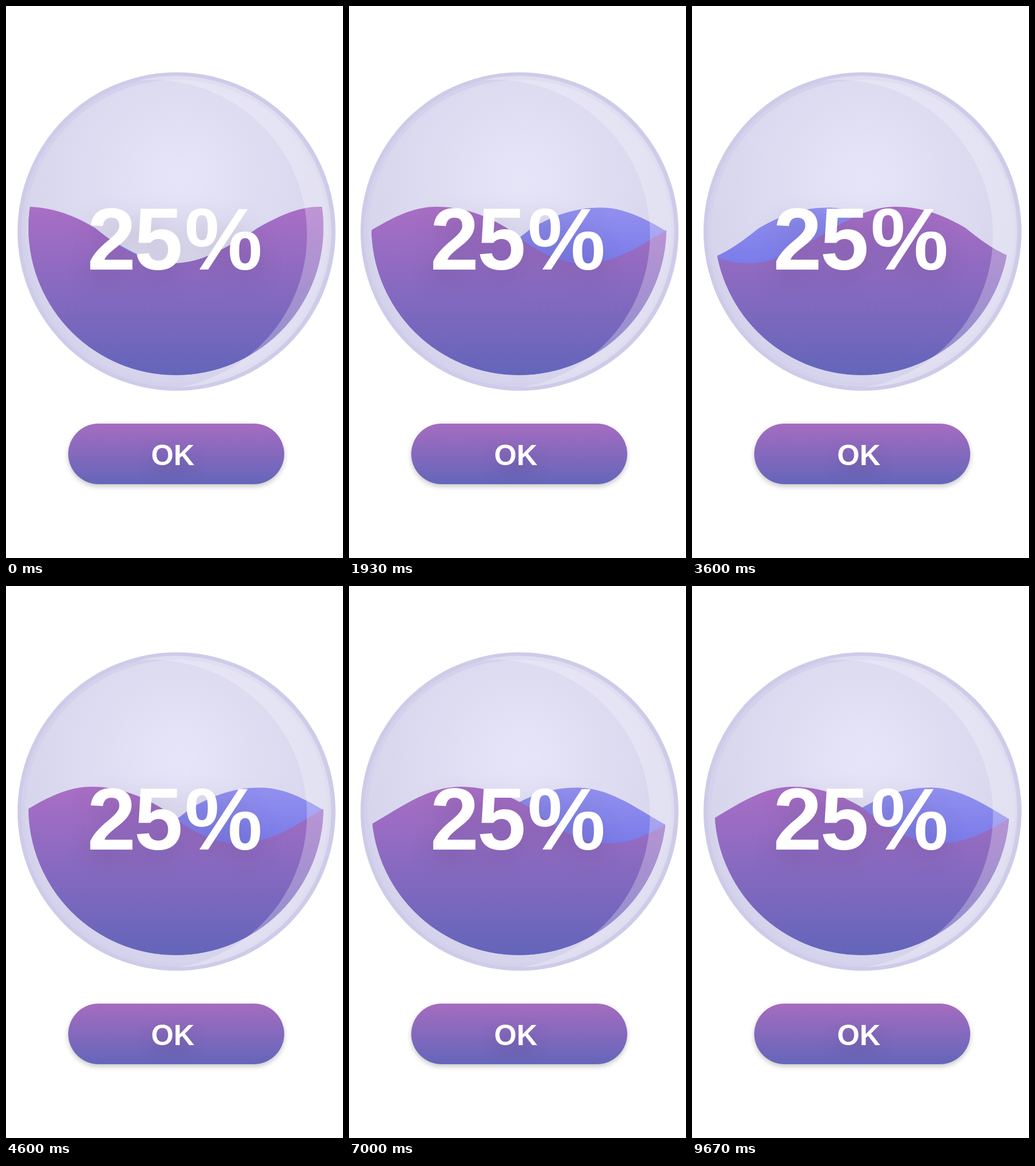
An HTML page that plays this animation: 585 px wide and 957 px high, repeating every 9.74 s.

```html
<!DOCTYPE html>
<html lang="en">
<head>
<meta charset="utf-8">
<title>Liquid progress</title>
<style>
  html, body { margin: 0; width: 100%; height: 100%; overflow: hidden; background: #fff; }
  svg { display: block; width: 100%; height: 100%; }
  text { font-family: "Liberation Sans", Arial, sans-serif; font-weight: bold; fill: #fff; }
  .percent { font-size: 152px; filter: drop-shadow(0 16px 20px rgba(40, 30, 60, .16)); }
  .label { font-size: 50px; filter: drop-shadow(0 12px 14px rgba(40, 30, 60, .2)); }
  .button { filter: drop-shadow(0 4px 4px rgba(0, 0, 0, .22)); }
</style>
</head>
<body>
<svg viewBox="0 0 585 957" preserveAspectRatio="none">
  <defs>
    <radialGradient id="glass" gradientUnits="userSpaceOnUse" cx="300" cy="300" r="300">
      <stop offset="0" stop-color="#e7e5f8"/>
      <stop offset=".75" stop-color="#dad8ee"/>
      <stop offset="1" stop-color="#d6d4ec"/>
    </radialGradient>
    <linearGradient id="frontFill" gradientUnits="userSpaceOnUse" x1="0" y1="348" x2="0" y2="640">
      <stop offset="0" stop-color="#a96ec5"/>
      <stop offset="1" stop-color="#6365ba"/>
    </linearGradient>
    <linearGradient id="backFill" gradientUnits="userSpaceOnUse" x1="0" y1="348" x2="0" y2="446">
      <stop offset="0" stop-color="#9290ee"/>
      <stop offset="1" stop-color="#7b7bea"/>
    </linearGradient>
    <linearGradient id="buttonFill" x2="0" y2="1">
      <stop offset="0" stop-color="#a56cc0"/>
      <stop offset="1" stop-color="#6466ba"/>
    </linearGradient>
    <clipPath id="bowl"><circle cx="295" cy="384" r="256"/></clipPath>
    <mask id="crescent" maskUnits="userSpaceOnUse" x="0" y="0" width="585" height="957">
      <circle cx="294" cy="391" r="270" fill="#fff"/>
      <circle cx="254" cy="396.5" r="268.5" fill="#000"/>
    </mask>
  </defs>

  <circle cx="296" cy="391" r="276" fill="#cecbe9"/>
  <circle cx="296" cy="391" r="269.5" fill="#d3d1eb"/>
  <circle cx="296" cy="391" r="263" fill="url(#glass)"/>

  <g clip-path="url(#bowl)">
    <g transform="translate(589 1.5) scale(-1 1)"><path class="wave" fill="url(#backFill)"/></g>
    <path class="wave" fill="url(#frontFill)"/>
  </g>
  <rect width="585" height="957" fill="#fff" fill-opacity=".27" mask="url(#crescent)"/>
  <text class="percent" x="141" y="457" dx="0 -3 3">25%</text>

  <rect class="button" x="108" y="724" width="375" height="105" rx="52.5" fill="url(#buttonFill)"/>
  <text class="label" x="252" y="795.5">OK</text>
</svg>
<script>
  const LOOP = 9740, FPS = 15, LENGTH = 512, START = 545;
  // [step, distance travelled to the left]
  const travel = [[0, 0], [29, 393], [54, 704], [84, 1114], [105, 1376], [127, 1658], [145, 1906], [147, 1932]];
  const waves = document.querySelectorAll('.wave');
  const tile = 'c52 0 92 19 122 37c43 35 83 61 136 61c92 0 162-98 254-98';
  const shape = tile.repeat(4) + 'V700h' + -4 * LENGTH + 'z';

  function distance(step) {
    const i = travel.findIndex(([s]) => s > step);
    const [s0, d0] = travel[i - 1], [s1, d1] = travel[i];
    return d0 + (d1 - d0) * (step - s0) / (s1 - s0);
  }

  function draw(now) {
    const step = Math.floor((now % LOOP) * FPS / 1000 + 0.1);
    const crest = (START - distance(step) + 4 * LENGTH) % LENGTH;
    const path = `M${crest - LENGTH} 348${shape}`;
    waves.forEach(wave => wave.setAttribute('d', path));
    requestAnimationFrame(draw);
  }
  draw(0);
</script>
</body>
</html>
```
